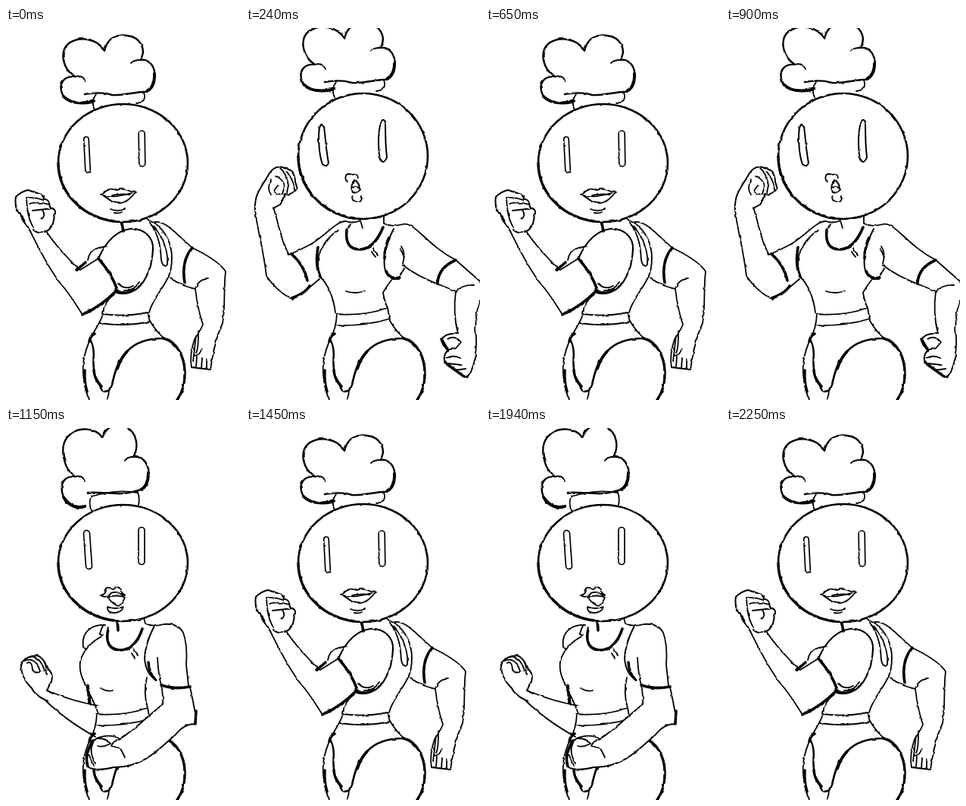
Write an HTML page that moves like this. It is 309x489 px and loops after 2500 ms.

```html
<!DOCTYPE html>
<html lang="en">
<head>
<meta charset="utf-8">
<title>Dancing chef</title>
<style>
  html, body { margin: 0; width: 100%; height: 100%; overflow: hidden; background: #fff; }
  svg { display: block; width: 100%; height: 100%; }
  path, rect, ellipse { stroke: #000; stroke-linecap: round; stroke-linejoin: round; }
  .patch { stroke: none; fill: #fff; }
</style>
</head>
<body>
<svg id="stage" viewBox="0 0 309 489"></svg>
<script>
const line = (d, w = 1.8, fill = 'none') => `<path d="${d}" stroke-width="${w}" fill="${fill}"/>`;
const solid = (d, w = 1.9) => line(d, w, '#fff');
const bold = d => line(d, 3.6);
const patch = d => `<path class="patch" d="${d}"/>`;
const group = (content, x = 0, y = 0) => `<g transform="translate(${x} ${y})">${content}</g>`;

// Slight unevenness of an inked line.
const inkFilter = `<filter id="ink" filterUnits="userSpaceOnUse" x="0" y="0" width="309" height="489" color-interpolation-filters="sRGB">
  <feTurbulence type="fractalNoise" baseFrequency=".12" numOctaves="2" seed="4"/>
  <feDisplacementMap in="SourceGraphic" scale="2.5" xChannelSelector="R" yChannelSelector="G"/></filter>`;

const legs =
  line('M112 408C103 426 99 447 104 468Q106 481 110 489M190 385Q199 400 209 408M136 476Q136 483 133 489') +
  line('M111 409C119 424 114 433 116 448Q117 462 124 469M124 470C127 482 137 479 140 469C144 450 149 435 160 425C172 412 190 408 208 408', 2.6) +
  line('M208 408C225 412 237 432 236 456C236 472 231 482 226 489', 3.4) +
  bold('M110 412Q111 405 117 402M104 450Q103 466 107 478M116 450Q117 462 126 471M147 448Q151 435 160 425');

const hat =
  line('M119 87C113 95 114 101 117 107M182 84C185 93 182 98 172 99') +
  line('M117 96C100 102 78 98 74 86C69 72 77 63 91 64C76 55 69 32 83 20C98 10 121 14 130 30C134 13 146 8 160 10C178 12 186 29 177 42C190 40 198 52 196 66C195 78 190 84 181 84C165 85 153 89 140 88C126 83 112 86 104 87', 2.4) +
  line('M91 64Q101 61 105 70M177 42Q169 42 165 46') +
  line('M76 90Q87 102 114 97M196 60Q197 77 186 83', 4);

const tallHat =
  line('M113 89C109 97 111 105 114 110M174 84Q177 94 175 101M113 90Q144 80 174 85') +
  line('M104 103C91 108 77 100 74 84C72 70 79 63 91 64C76 54 70 25 81 12C94-4 121 0 127 13C133-3 145-7 158-2C173 6 176 25 168 38C181 36 190 49 188 63C187 75 180 82 170 83C152 90 126 83 108 85', 2.4) +
  line('M91 64Q101 61 104 70M168 38Q160 38 157 43') +
  line('M76 91Q87 108 104 103M188 59Q188 75 179 81', 4);

function head(top, bottom, left = 69) {
  const cx = (left + 240) / 2, rx = (240 - left) / 2, cy = (top + bottom) / 2, ry = (bottom - top) / 2;
  return `<ellipse cx="${cx}" cy="${cy}" rx="${rx}" ry="${ry}" stroke-width="2.6" fill="#fff"/>` +
    line(`M${left} ${cy}A${rx} ${ry} 0 0 0 ${cx - 12} ${bottom - 1}`, 3.4);
}

const eye = (x, y, w, h, tilt) =>
  `<rect x="${x - w / 2}" y="${y - h / 2}" width="${w}" height="${h}" rx="${w / 2}" stroke-width="1.7" fill="none" transform="rotate(${tilt} ${x} ${y})"/>`;

const eyes = {
  calm: eye(107, 166.5, 6.5, 47, -3) + eye(179.5, 158.5, 8, 47, -1),
  wide: eye(107, 165, 8, 47, -7) + eye(179, 156, 8, 45, -4),
  tall: line('M99 127C94 133 96 166 101 179Q107 184 109 177C106 163 105 145 103 130Q101 125 99 127ZM180 121C174 130 174 157 177 173Q182 180 186 170C184 153 184 139 184 124Q183 120 180 121Z', 2),
  level: eye(108, 160, 8, 51, -4) + eye(179, 155, 8, 49, 0)
};

const mouth = {
  smile: line('M125 219C130 219 130 213 137 212C143 210 146 216 150 211C156 209 158 215 172 216C166 219 165 226 155 229C142 233 138 226 128 220Q144 224 166 217M132 222Q148 217 164 219M138 238Q147 242 157 238M143 243Q149 244 153 242'),
  grin: line('M124 213C135 215 137 204 147 205C153 208 156 202 161 204Q166 209 176 210C169 213 166 225 157 229C143 234 139 224 133 217M129 214Q150 217 171 211M139 224Q149 218 162 223M140 234Q151 237 163 231Q159 243 150 242Q143 241 140 234'),
  pout: line('M134 202Q130 199 132 194Q134 190 140 193Q147 190 148 197M140 221Q140 229 147 229Q154 228 153 221') +
    line('M143 200Q150 203 150 212Q147 218 141 216Q137 207 143 200ZM139 211Q143 207 149 210', 2),
  talk: line('M125 220Q131 219 132 214Q130 209 137 210L142 212Q149 207 151 212Q152 217 158 220M125 220Q130 223 133 221Q139 215 146 216Q154 218 157 222Q154 232 148 234Q140 231 133 221M135 222Q146 219 156 222M134 235Q133 243 144 243Q153 242 155 235Q145 239 134 235')
};

const waistSide = line('M128 376C125 387 117 397 111 409');
const waistBack = line('M128 376Q157 380 187 374L190 386M124 388Q158 393 190 386') + waistSide;
const waistFront = line('M119 376Q155 379 187 368L190 384M118 391Q160 392 190 382M120 376Q119 396 111 409');

const bodies = {
  flex:
    waistBack +
    line('M184 246Q189 257 197 255C212 254 224 270 246 289C263 297 281 307 290 320C287 344 290 366 286 388C279 403 274 421 270 449L245 446Q242 430 249 409Q257 397 260 390Q253 369 250 343C239 340 227 337 217 328') +
    line('M250 342Q254 331 266 329M247 438L251 405M248 431Q257 430 258 422M251 445L252 432M258 447L259 434M265 448L265 436M254 402Q254 422 251 427') +
    bold('M246 289Q231 306 236 335') +
    line('M190 256C203 274 204 289 205 305Q208 317 213 311C215 289 203 267 192 259M196 256C213 269 219 286 219 303Q219 318 214 328C205 346 193 357 189 374M143 350Q129 360 128 376') +
    line('M122 303C130 285 143 267 164 264C183 263 195 276 194 291C193 318 181 342 165 347Q155 350 147 345', 2.2) +
    line('M108 305Q110 292 122 289L133 287M148 336Q157 345 168 339M156 345Q169 346 176 334') +
    bold('M152 253L155 267M122 303Q139 322 147 344M146 347Q158 351 169 344') +
    line('M122 303L98 318C80 302 65 285 52 266M147 345Q130 362 101 377C92 363 84 349 72 336C55 314 42 287 32 267') +
    line('M32 267Q26 257 22 249L17 244Q11 233 13 222Q20 215 29 213L44 218Q49 219 50 225Q57 224 58 236Q66 238 65 243L62 257Q57 268 50 268Q43 272 36 265', 2) +
    line('M28 223Q38 222 49 226M31 231Q43 228 57 232M35 240L62 237M27 223Q28 249 36 262M17 244Q23 255 29 262M48 239Q53 247 47 251') +
    bold('M93 318Q101 312 105 308M147 344Q127 365 101 377'),

  raise:
    waistBack +
    line('M181 244Q187 255 203 254C221 253 232 278 254 292C270 301 294 316 296 332C293 350 283 380 279 409C272 432 268 448 262 458L243 453Q228 438 230 421Q239 414 248 415Q254 404 253 393L250 347M237 336Q227 334 215 328') +
    line('M250 347Q259 334 271 334M193 352Q189 375 206 388L232 409M232 419L233 432L242 428L243 420M234 432Q236 440 246 437M238 443Q244 449 252 444M246 454Q255 447 255 437') +
    bold('M254 292Q239 313 237 336M231 420Q229 435 241 451') +
    line('M188 255C203 272 204 291 206 307Q210 314 212 304C211 282 200 264 193 258M196 254C213 268 217 286 216 307Q216 320 210 331L189 374M146 349Q130 360 128 376') +
    line('M122 297C134 277 153 264 170 264C190 265 199 281 196 301C193 327 186 344 166 347Q155 349 146 345', 2.2) +
    line('M101 304Q112 294 133 291M92 252Q106 273 126 285M151 338Q164 343 176 334') +
    bold('M149 250L154 266M122 297Q139 321 143 347'),

  swing:
    waistFront +
    line('M150 254Q139 257 132 254C119 254 106 272 86 284Q71 292 57 298C46 281 43 255 36 236M12 238C14 262 23 290 27 326Q40 345 58 355Q76 349 85 340L97 330') +
    line('M12 238Q11 222 20 209L31 191Q36 183 45 182L59 187Q65 193 65 202L68 212L62 216Q57 220 51 218Q47 234 36 237', 2) +
    line('M45 184Q54 192 56 207L54 216M54 189Q64 202 64 213M39 195Q49 198 51 208L48 218Q40 222 37 214L42 207M33 199Q27 211 33 219') +
    line('M122 266C100 279 89 304 98 327Q114 343 118 374M132 346Q144 350 157 346M154 263L151 253M133 267L138 258M194 329Q185 340 181 348Q183 360 187 368M205 287Q211 295 207 310M168 290L174 299M166 294L171 302M203 290L209 301') +
    line('M182 244L182 257Q192 262 207 258C223 254 238 285 277 305L309 333M207 312Q228 327 252 336L277 346Q273 376 280 402M277 348Q284 337 301 338M309 358Q301 380 304 409Q305 438 292 460') +
    solid('M280 402Q263 400 258 410Q260 419 267 423Q259 431 263 441L287 458Q296 463 304 430', 2) +
    line('M266 409Q276 403 284 413L277 421L267 423M264 434Q274 429 283 434M267 441L285 443M275 450L290 448') +
    line('M195 264C182 289 179 314 187 325Q194 334 203 326L209 316', 2) +
    bold('M60 297Q77 312 81 332M95 288Q91 312 98 327M133 265Q130 291 150 291Q169 291 181 262M189 276Q183 288 183 303M185 320Q192 332 202 328M277 305Q254 315 253 335M62 355Q79 348 84 339M258 409L267 424M263 440L288 458'),

  cross:
    waistFront +
    line('M131 259Q110 258 103 274Q99 288 106 291M126 274Q107 284 99 303C92 326 112 345 122 376M125 342Q133 347 141 345M128 260Q121 274 128 272M186 328Q181 348 187 368M169 291L174 299M166 296L170 303') +
    line('M62 348Q88 359 121 365M51 357Q77 383 118 406M109 340L112 364') +
    solid('M51 357Q38 351 34 342Q19 328 20 309Q28 299 42 299Q51 304 56 317Q63 324 60 333L54 345L62 349', 2) +
    line('M25 306Q39 300 45 320M33 300Q46 302 51 319M43 300Q53 304 54 324M28 309Q34 305 35 318Q39 324 46 320') +
    line('M181 246L184 257Q195 262 208 258Q227 256 234 269Q240 285 238 311L241 339M200 302Q201 323 205 338Q208 355 207 363') +
    solid('M207 363Q188 379 173 392L151 409C138 402 126 404 115 411Q103 429 107 445Q120 452 142 446C182 447 205 419 224 403Q235 389 249 389L251 380L243 340') +
    line('M151 409Q141 411 139 418L151 421L157 433M115 414Q109 425 118 441M122 408Q133 408 138 415Q128 420 121 418M108 426L116 444') +
    bold('M147 253L148 266M135 264Q129 291 151 292Q171 291 180 264M108 338L110 361M205 338Q222 344 243 340M188 308Q189 324 198 331M115 411Q103 430 108 444M251 372L250 389') +
    line('M196 260Q184 283 183 303Q185 324 198 331', 2)
};

// The raised fist passes in front of the face.
const raisedArm =
  patch('M122 297L97 308C85 295 78 271 64 252L38 244C37 267 48 287 58 305C68 330 79 357 98 375Q122 367 144 347Z') +
  line('M122 297L97 308C85 295 78 271 64 252M144 347Q120 368 98 375C80 357 69 331 58 305C48 287 36 267 37 243') +
  solid('M37 243Q42 225 45 203Q49 193 59 193L79 201Q85 207 83 216Q88 225 85 231L77 237Q73 249 64 252', 2) +
  line('M49 206Q64 199 80 206M50 214Q67 208 83 215M58 222Q71 217 85 222M48 207Q46 221 52 230M63 228Q76 227 76 234Q71 238 66 231') +
  bold('M98 375L104 373M52 198L46 204') +
  bold('M122 297Q139 321 143 347');

const poses = {
  flex: bodies.flex + group(hat) + head(100, 255) + eyes.calm + mouth.smile,
  bounce: bodies.flex + group(hat, 0, -8) + head(97, 255) + eyes.calm + mouth.smile,
  raise: bodies.raise + group(hat, 1, 15) + head(107, 250, 71) + eyes.wide + mouth.grin + raisedArm,
  swing: bodies.swing + group(hat, 0, -16) + head(86, 251) + eyes.tall + mouth.pout,
  swingHold: bodies.swing + group(hat) + head(99, 253) + eyes.level + mouth.talk,
  cross: bodies.cross + tallHat + head(101, 254) + eyes.level + mouth.talk,
  crossHold: bodies.cross + group(hat) + head(100, 254) + eyes.calm + mouth.smile
};

const LOOP = 2500;
const timeline = [
  [0, 'flex'], [170, 'swing'], [250, 'cross'], [320, 'crossHold'], [490, 'raise'], [570, 'bounce'],
  [650, 'flex'], [900, 'swing'], [980, 'swingHold'], [1150, 'cross'], [1220, 'crossHold'], [1370, 'raise'],
  [1450, 'flex'], [1680, 'swing'], [1780, 'swingHold'], [1940, 'cross'], [2020, 'crossHold'], [2170, 'raise'],
  [2250, 'flex']
];

const stage = document.getElementById('stage');
stage.innerHTML = inkFilter + Object.entries(poses)
  .map(([name, art]) => `<g id="${name}" display="none" filter="url(#ink)">${legs}${art}</g>`).join('');

let shown;
function show(name) {
  if (name === shown) return;
  if (shown) document.getElementById(shown).setAttribute('display', 'none');
  document.getElementById(name).removeAttribute('display');
  shown = name;
}

let start;
function tick(now) {
  start ??= now;
  const time = (now - start) % LOOP;
  show(timeline.findLast(([at]) => at <= time)[1]);
  requestAnimationFrame(tick);
}
show('flex');
requestAnimationFrame(tick);
</script>
</body>
</html>
```
